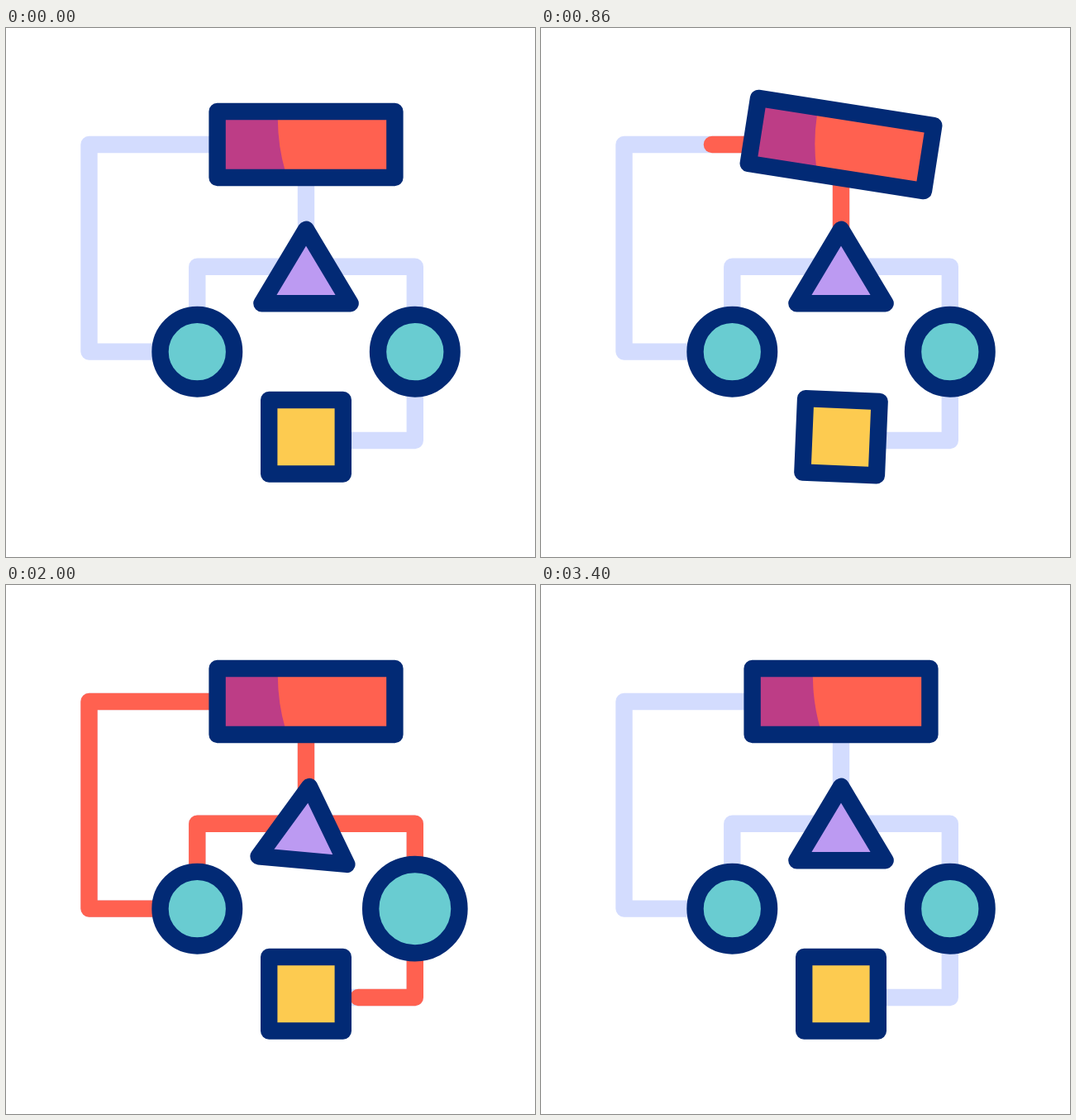
An HTML page without scripts for the animation above (3600 ms loop, 640 by 640 pixels).

```html
<!DOCTYPE html>
<html lang="en">
<head>
<meta charset="utf-8">
<title>Flow chart</title>
<style>
  @property --head { syntax: "<length>"; inherits: true; initial-value: 0px; }
  @property --tail { syntax: "<length>"; inherits: true; initial-value: 0px; }

  :root { --loop: 3.6s; --ease: cubic-bezier(.37, 0, .63, 1); }
  html, body { margin: 0; width: 100%; height: 100%; overflow: hidden; background: #fff; }
  svg { display: block; width: 640px; height: 640px; }

  .wires, .node {
    stroke-width: 20.4;
    stroke-linecap: round;
    stroke-linejoin: round;
  }
  .wires { fill: none; stroke: #d3dcfe; }

  /* The flow shows the stretch between tail and head, across both wires. */
  .flow {
    stroke: #ff6150;
    stroke-dasharray: calc(var(--head) - var(--tail)) 9999px;
    animation: draw var(--loop) var(--ease) infinite, erase var(--loop) var(--ease) infinite;
  }
  .flow use { stroke-dashoffset: calc(var(--start) - var(--tail)); }
  @keyframes draw { 0%, 7.28% { --head: 0px; } 62.97%, 100% { --head: 1500px; } }
  @keyframes erase { 0%, 64.61% { --tail: 0px; } 95.44%, 100% { --tail: 1500px; } }

  .node { stroke: #022a75; }
  .node, .node * {
    transform-box: fill-box;
    transform-origin: center;
    vector-effect: non-scaling-stroke;
  }
  .bump { animation: bump var(--loop) var(--ease) var(--at) infinite; }
  @keyframes bump { 0%, 12.22%, 100% { scale: 1; } 6.11% { scale: 1.35; } }

  .bar { animation: tilt-bar var(--loop) var(--ease) infinite; }
  .triangle { animation: tilt-triangle var(--loop) var(--ease) infinite; }
  .square { animation: tilt-square var(--loop) var(--ease) infinite; }
  @keyframes tilt-bar { 0%, 2.8%, 37.4%, 100% { rotate: 0deg; } 20.1% { rotate: 10deg; } }
  @keyframes tilt-triangle { 0%, 34.3%, 62.9%, 100% { rotate: 0deg; } 48.6% { rotate: 10deg; } }
  @keyframes tilt-square {
    0%, 28.6%, 57.5%, 86.1%, 100% { rotate: 0deg; }
    14.3% { rotate: 10deg; }
    71.8% { rotate: -10deg; }
  }
</style>
</head>
<body>
<svg viewBox="0 0 640 640">
  <defs>
    <path id="stem" d="M363 141V288.7"/>
    <path id="route" d="M363 141H100.5V391.6H231.3V288.7H494.8V499H363"/>
  </defs>

  <g class="wires">
    <use href="#stem"/>
    <use href="#route"/>
  </g>
  <g class="wires flow">
    <use href="#stem" style="--start: 0px"/>
    <use href="#route" style="--start: 147.7px"/>
  </g>

  <g class="node bar">
    <path d="M255.6 101H470.4V181H255.6Z" fill="#ff6150" stroke="none"/>
    <path d="M255.6 101H328.8V110Q329 143 338 174V181H255.6Z" fill="#bd3d86" stroke="none"/>
    <path d="M255.6 101H470.4V181H255.6Z" fill="none"/>
  </g>
  <g class="node triangle">
    <path class="bump" style="--at: 1.267s" d="M363 243.8L416.6 333.3H309.4Z" fill="#bc9af2"/>
  </g>
  <g class="node" fill="#69ccd1">
    <circle class="bump" style="--at: 1.14s" cx="231.3" cy="391.7" r="44.8"/>
    <circle class="bump" style="--at: 1.68s" cx="494.8" cy="391.7" r="44.8"/>
  </g>
  <g class="node square">
    <path class="bump" style="--at: 2.043s" d="M318.2 450H407.8V539.5H318.2Z" fill="#fdcb50"/>
  </g>
</svg>
</body>
</html>
```
